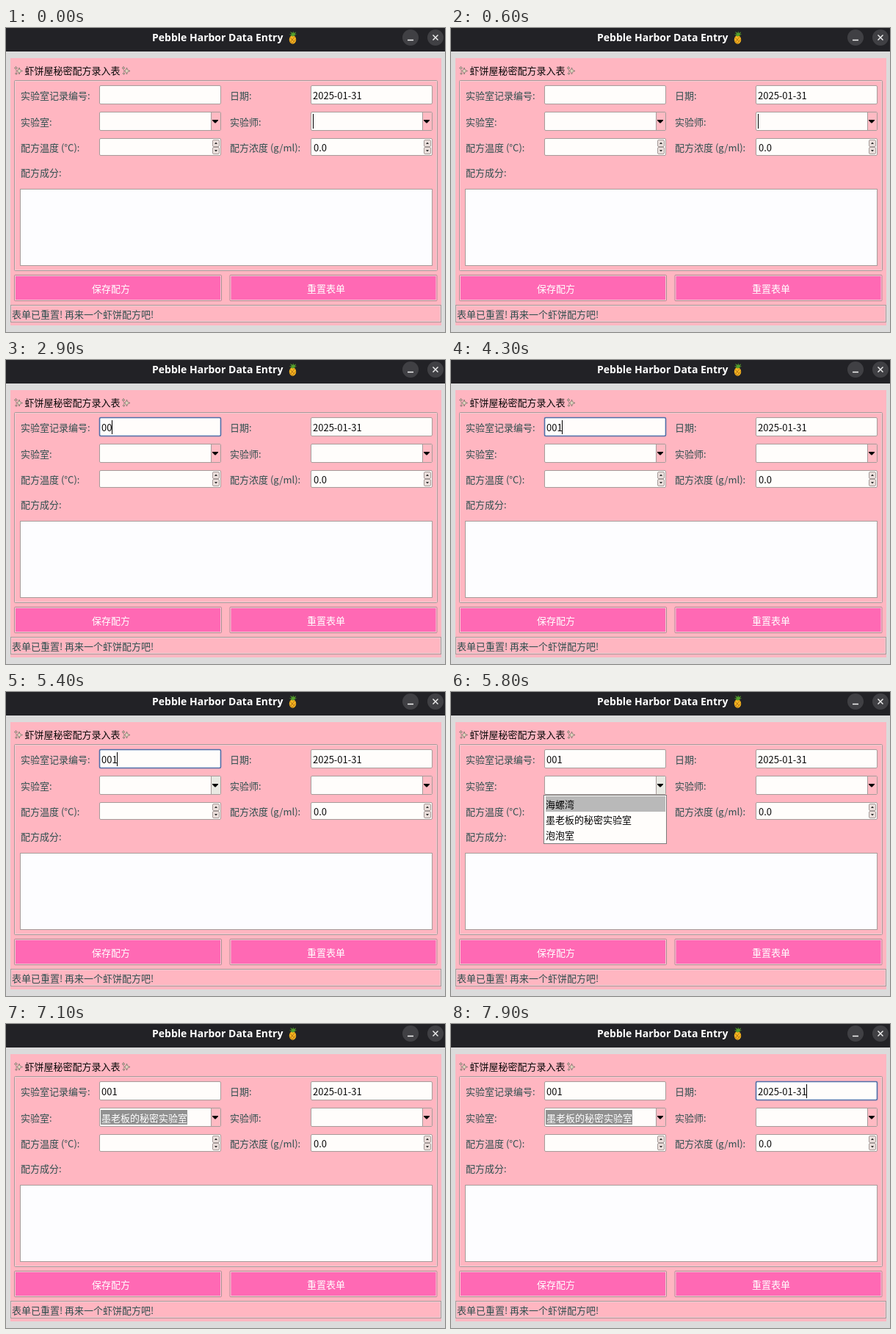
These frames come from a looping animation (598x414 px, 8 s). An HTML page:

```html
<!DOCTYPE html>
<html lang="zh-CN">
<head>
<meta charset="utf-8">
<title>Data Entry</title>
<style>
  html, body { margin: 0; width: 100%; height: 100%; overflow: hidden; background: #dbdbdb; }
  svg { display: block; width: 598px; height: 414px; }
  text { font: 13px "Noto Sans CJK SC", "Noto Sans CJK", "Noto Sans", sans-serif; white-space: pre; }
  .label text { fill: #2f4f4f; }
  .value text { fill: #080808; }
  .field { fill: #fffdfb; stroke: #a69c9a; }
  .line { fill: none; stroke: #a69a9a; }
  .shine { fill: none; stroke: #f8ccd2; }
  .button { fill: #ff69b4; stroke: #ad8b93; }
  .ring { fill: none; stroke: #4f6fa8; stroke-width: 1.6; }
  .caret { fill: #000; }

  /* Everything switches hard on one 8 s clock: 1% = 80 ms. */
  .anim { animation: 8s step-end infinite; }
  .lab-tech { animation-name: lab-tech; }
  .number-ring { animation-name: number-ring; }
  .number-caret { animation-name: caret-move, caret-blink; }
  .digit1 { animation-name: digit1; }
  .digit2 { animation-name: digit2; }
  .digit3 { animation-name: digit3; }
  .hover { animation-name: hover; }
  .popup { animation-name: popup; }
  .highlight { animation-name: highlight; }
  .chosen { animation-name: chosen; }
  .date-focus { animation-name: date-focus; }

  @keyframes lab-tech { 0%, 16.25% { opacity: 1 } 8.75%, 22.5%, 100% { opacity: 0 } }
  @keyframes number-ring { 0%, 71.25%, 100% { opacity: 0 } 22.5% { opacity: 1 } }
  @keyframes caret-move {
    0%, 100% { transform: translateX(0) }
    33.75% { transform: translateX(7px) }
    35% { transform: translateX(14px) }
    38.75% { transform: translateX(21px) }
  }
  @keyframes caret-blink {
    0%, 30%, 45%, 56.25%, 71.25%, 100% { opacity: 0 }
    22.5%, 33.75%, 53.75%, 63.75% { opacity: 1 }
  }
  @keyframes digit1 { 0% { opacity: 0 } 33.75%, 100% { opacity: 1 } }
  @keyframes digit2 { 0% { opacity: 0 } 35%, 100% { opacity: 1 } }
  @keyframes digit3 { 0% { opacity: 0 } 38.75%, 100% { opacity: 1 } }
  @keyframes hover {
    0%, 88.75%, 100% { opacity: 0 }
    65% { opacity: .33 }
    66.25% { opacity: .67 }
    67.5% { opacity: 1 }
  }
  @keyframes popup { 0%, 88.75%, 100% { opacity: 0 } 71.25% { opacity: 1 } }
  @keyframes highlight { 0% { transform: translateY(-21px) } 82.5%, 100% { transform: none } }
  @keyframes chosen { 0% { opacity: 0 } 88.75%, 100% { opacity: 1 } }
  @keyframes date-focus { 0% { opacity: 0 } 96.25%, 100% { opacity: 1 } }
</style>
</head>
<body>
<svg viewBox="0 0 598 414">
  <defs>
    <rect id="entry" class="field" x=".5" y=".5" width="165" height="25" rx="1.5"/>
    <path id="arrow" d="M154 11h8v1l-3.500 3.500h-1L154 12z"/>
    <g id="combo">
      <use href="#entry"/>
      <path d="M152.500 1H165v24h-12.500z" fill="#ffbac3"/>
      <path class="line" d="M152.500 1v24"/>
      <use href="#arrow"/>
    </g>
    <rect id="step" x="154.500" y="2.500" width="9" height="9" rx="1.500" fill="#eadedb" stroke="#a69c9a"/>
    <g id="spin">
      <rect class="field" x=".5" y=".5" width="165" height="23" rx="1.500"/>
      <use href="#step"/>
      <use href="#step" y="10"/>
      <path d="M157 8l2-2.500 2 2.500zM157 16l2 2.500 2-2.500z" fill="#2c2c2c"/>
    </g>
    <g id="sparkle" fill="#e8dcc4" stroke="#6b625c" stroke-width=".7" stroke-linejoin="round">
      <path d="M6.500 1.500l1.200 3.300L11 6 7.700 7.200 6.500 10.500 5.300 7.200 2 6l3.300-1.200z"/>
      <path d="M2 0l.6 1.400L4 2l-1.400.6L2 4l-.6-1.400L0 2l1.400-.6zM2.500 8l.5 1 1 .5-1 .5-.5 1-.5-1-1-.5 1-.5z"/>
    </g>
    <g id="button">
      <rect class="button" x=".5" y=".5" width="282" height="35" rx="1"/>
      <rect class="shine" x="1.500" y="1.500" width="280" height="33"/>
    </g>
  </defs>

  <rect width="598" height="414" fill="#dbdbdb"/>
  <rect width="598" height="32" fill="#222226"/>
  <text x="199" y="18" fill="#fff" style="font:bold 14px 'Noto Sans',sans-serif">Pebble Harbor Data Entry</text>
  <g transform="translate(390.500 13) scale(1.180) translate(-390.500 -13)">
    <ellipse cx="390.500" cy="15.500" rx="4" ry="5" fill="#f5b51f"/>
    <path d="M387.500 13l5 5m-5.500-1.500l3 3m3-7.500l-5 6m6-3l-4 5" stroke="#b26c18" stroke-width=".7"/>
    <path d="M390.500 12l-4-3 3 .3-2-3.300 3 2 .5-2.500 1 2.500 2.500-1.500-1.500 3 2.500-.5z" fill="#55a02d"/>
  </g>
  <g fill="#404044">
    <circle cx="551" cy="13" r="11"/>
    <circle cx="585" cy="13" r="11"/>
  </g>
  <path d="M547 16.500h8M581.500 9.500l7 7m0-7l-7 7" stroke="#f5f5f5" stroke-width="1.400"/>

  <rect x="6" y="41" width="587" height="364" fill="#ffb6c1"/>
  <use href="#sparkle" x="11.500" y="52.500"/>
  <text x="25.500" y="63" fill="#080808">虾饼屋秘密配方录入表</text>
  <use href="#sparkle" x="158" y="52.500"/>

  <rect class="shine" x="12.500" y="72.500" width="574" height="257"/>
  <rect class="line" x="11.500" y="71.500" width="576" height="259" rx="1"/>
  <g class="label">
    <text x="20" y="97">实验室记录编号:</text>
    <text x="305" y="97">日期:</text>
    <text x="20" y="133">实验室:</text>
    <text x="305" y="133">实验师:</text>
    <text x="20" y="168">配方温度 (°C):</text>
    <text x="305" y="168">配方浓度 (g/ml):</text>
    <text x="20" y="202">配方成分:</text>
  </g>
  <use href="#entry" x="127" y="78"/>
  <use href="#entry" x="415" y="78"/>
  <use href="#combo" x="127" y="114"/>
  <use href="#combo" x="415" y="114"/>
  <use href="#spin" x="127" y="150"/>
  <use href="#spin" x="415" y="150"/>
  <rect x="19.500" y="219.500" width="561" height="104" fill="#fdfdff" stroke="#a69c9a"/>

  <use href="#button" x="11" y="336"/>
  <use href="#button" x="304.500" y="336"/>
  <g fill="#fff">
    <text x="117" y="360">保存配方</text>
    <text x="410" y="360">重置表单</text>
  </g>
  <rect class="shine" x="7.500" y="378.500" width="584" height="21"/>
  <rect class="line" x="6.500" y="377.500" width="586" height="23"/>
  <g class="label"><text x="8" y="395">表单已重置! 再来一个虾饼配方吧!</text></g>

  <g class="value">
    <text x="418" y="97">2025-01-31</text>
    <text x="419" y="168">0.0</text>
    <text class="anim digit1" x="130" y="97">0</text>
    <text class="anim digit2" x="137.200" y="97">0</text>
    <text class="anim digit3" x="144.400" y="97">1</text>
  </g>

  <rect class="caret anim lab-tech" x="418" y="117" width="1" height="20"/>
  <rect class="ring anim number-ring" x="127.500" y="78.500" width="165" height="25" rx="1.500"/>
  <rect class="caret anim number-caret" x="130" y="82" width="1" height="19"/>
  <g class="anim date-focus">
    <rect class="ring" x="415.500" y="78.500" width="165" height="25" rx="1.500"/>
    <rect class="caret" x="484" y="82" width="1" height="19"/>
  </g>

  <g class="anim hover">
    <path d="M280 115h12v24h-12z" fill="#e9e9e3"/>
    <use href="#arrow" x="127" y="114"/>
  </g>
  <g class="anim chosen">
    <rect x="129" y="117" width="118" height="20" fill="#919191"/>
    <text x="130" y="133" fill="#fff">墨老板的秘密实验室</text>
  </g>
  <g class="anim popup value">
    <rect x="126.500" y="140.500" width="167" height="66" fill="#fffdfb" stroke="#7b7b7b"/>
    <rect class="anim highlight" x="129" y="163" width="163" height="21" fill="#b9b9b9"/>
    <text x="129" y="158">海螺湾</text>
    <text x="129" y="179">墨老板的秘密实验室</text>
    <text x="129" y="200">泡泡室</text>
  </g>
</svg>
</body>
</html>
```
